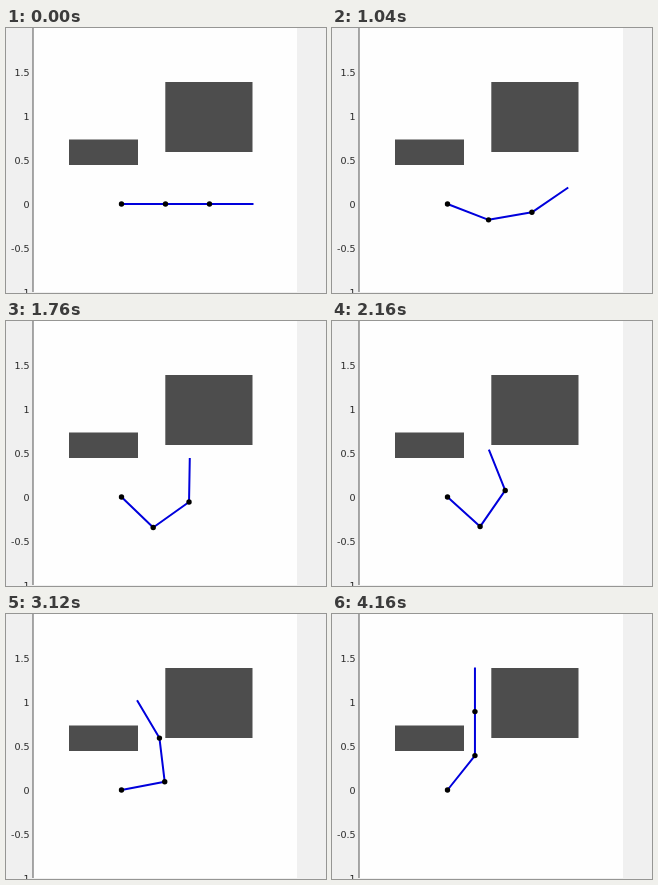
Recreate the animation shown at these times as an HTML page with a canvas. Size 320 px wide and 265 px high, loop 4240 ms.

```html
<!DOCTYPE html>
<html lang="en">
<head>
<meta charset="utf-8">
<title>Robot arm between obstacles</title>
<style>
  html, body { margin: 0; width: 100%; height: 100%; overflow: hidden; background: #f0f0f0; }
  canvas { display: block; }
</style>
</head>
<body>
<canvas id="stage" width="320" height="265"></canvas>
<script>
const ctx = document.getElementById('stage').getContext('2d');
const STEP = 80, STEPS = 53, LAST = STEPS - 1;
const UNIT = 88, LINK = UNIT / 2, BASE = { x: 115.5, y: 176 };

// Link directions in degrees at a few poses along the path
const END = [51.4, 90, 90];
const VIA = [
  { s: 8 / LAST, angles: [-7.3, 2.7, 11.2] },
  { s: 18 / LAST, angles: [-36.2, 22.2, 64.9] },
  { s: 27 / LAST, angles: [-42.2, 55.2, 111.8] },
  { s: 34 / LAST, angles: [-16.4, 83.1, 123.7] },
  { s: 43 / LAST, angles: [30.3, 100.4, 113.6] }
];

const smooth = s => s ** 3 * (10 - 15 * s + 6 * s * s);
const bump = s => s ** 3 * (1 - s) ** 2;

// Polynomial through all poses, at rest at both ends
function angleAt(link, s) {
  let detour = 0;
  for (const p of VIA) {
    let weight = (p.angles[link] - END[link] * smooth(p.s)) / bump(p.s);
    for (const o of VIA) if (o !== p) weight *= (s - o.s) / (p.s - o.s);
    detour += weight;
  }
  return (END[link] * smooth(s) + bump(s) * detour) * Math.PI / 180;
}

function rect(color, x, y, w, h) {
  ctx.fillStyle = color;
  ctx.fillRect(x, y, w, h);
}

function drawPlot() {
  rect('#f0f0f0', 0, 0, 320, 265);
  rect('#fefefe', 27, 0, 264, 264);
  rect('#4d4d4d', 63, 111.5, 69, 25.5);
  rect('#4d4d4d', 159.3, 54, 87.2, 70);
  rect('#555', 26.5, 0, 1, 264);
  ctx.fillStyle = '#262626';
  ctx.font = '9.5px "DejaVu Sans", sans-serif';
  ctx.textAlign = 'right';
  for (let v = -1; v < 2; v += 0.5) ctx.fillText(String(v), 23.5, BASE.y - v * UNIT + 3.7);
}

function drawArm(s) {
  const joints = [BASE];
  for (let i = 0; i < 3; i++) {
    const a = angleAt(i, s), { x, y } = joints[i];
    joints.push({ x: x + LINK * Math.cos(a), y: y - LINK * Math.sin(a) });
  }
  ctx.strokeStyle = '#0000dc';
  ctx.lineWidth = 2;
  ctx.lineJoin = 'round';
  ctx.beginPath();
  for (const { x, y } of joints) ctx.lineTo(x, y);
  ctx.stroke();
  ctx.fillStyle = '#000';
  for (const { x, y } of joints.slice(0, 3)) {
    ctx.beginPath();
    ctx.arc(x, y, 2.7, 0, 2 * Math.PI);
    ctx.fill();
  }
}

const start = performance.now();
function draw() {
  const step = Math.floor((performance.now() - start) / STEP) % STEPS;
  drawPlot();
  drawArm(step / LAST);
  requestAnimationFrame(draw);
}
draw();
</script>
</body>
</html>
```
